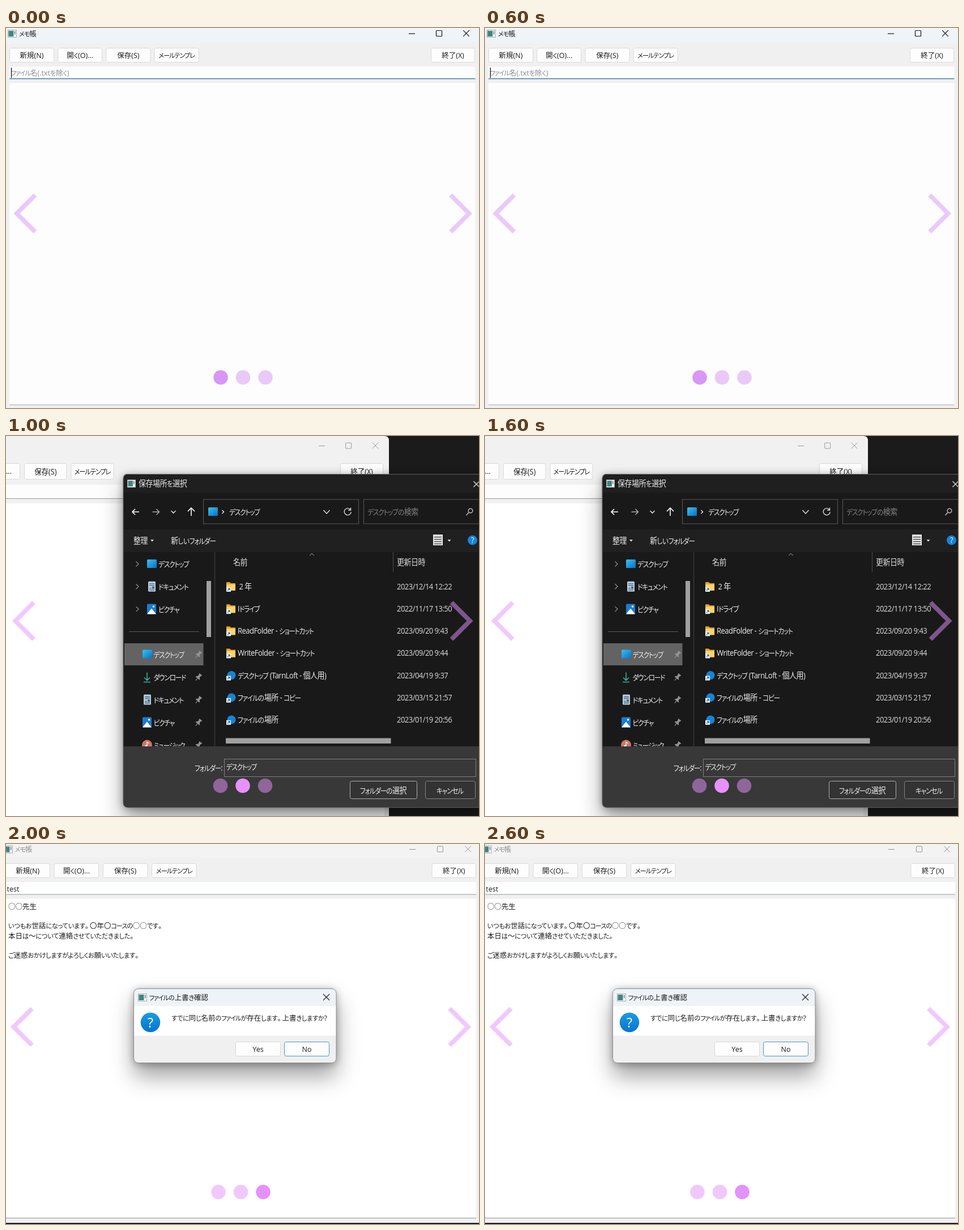
Animation of 835x671 px, one loop 3 s. Source, as an HTML page:

```html
<!DOCTYPE html>
<html lang="ja">
<head>
<meta charset="utf-8">
<title>メモ帳</title>
<style>
html, body { margin: 0; width: 100%; height: 100%; overflow: hidden; background: #f0f0f0; }
svg { display: block; width: 835px; height: 671px; }
text {
  font: 12.5px "Open Sans", "Noto Sans CJK JP", "Noto Sans CJK", sans-serif;
  font-feature-settings: "palt";
  fill: #1b1b1b;
}
.hira { font-size: .9em; letter-spacing: -.03em; }
.kata { font-size: .9em; letter-spacing: -.1em; }
.stop { letter-spacing: .15em; }
#pick text { scale: 1 1.1; }
.dark text { font-size: 13px; letter-spacing: -.04em; fill: #eee; }
.scene { visibility: hidden; animation: show 3s step-end infinite; }
#pick { animation-delay: -2s; }
#confirm { animation-delay: -1s; }
@keyframes show {
  0% { visibility: visible; }
  33.3333%, 100% { visibility: hidden; }
}
.shadow { filter: drop-shadow(0 2px 7px rgba(0,0,0,.32)) drop-shadow(0 23px 19px rgba(0,0,0,.36)); }
</style>
</head>
<body>
<svg viewBox="0 0 835 671">
  <defs>
    <linearGradient id="bar" x2="0" y2="1">
      <stop offset=".7" stop-color="#eff4f9"/><stop offset="1" stop-color="#f0f0f0"/>
    </linearGradient>
    <linearGradient id="blue" x2="1" y2="1">
      <stop stop-color="#35c3f0"/><stop offset="1" stop-color="#0b6fc4"/>
    </linearGradient>
    <linearGradient id="ask" x2="0" y2="1">
      <stop stop-color="#1a9be6"/><stop offset="1" stop-color="#0a74cc"/>
    </linearGradient>
    <clipPath id="list"><rect x="207" y="205" width="628" height="343"/></clipPath>
  </defs>
  <g id="blank" class="scene"></g>
  <g id="pick" class="scene"></g>
  <g id="confirm" class="scene"></g>
</svg>
<script>
const kana = s => s.replace(/([ぁ-ゖ]+)|([ァ-ヺー]+)|。/g,
  (run, hira, kata) => `<tspan class="${hira ? 'hira' : kata ? 'kata' : 'stop'}">${run}</tspan>`);
const text = (x, y, s, style = '') =>
  `<text style="translate:${x}px ${y}px;${style}">${kana(s)}</text>`;
const mid = (x, y, s, style = '') => text(x, y, s, 'text-anchor:middle;' + style);
const box = (x, y, w, h, fill, more = '') =>
  `<rect x="${x}" y="${y}" width="${w}" height="${h}" fill="${fill}" ${more}/>`;
const line = (d, color, w = 1, more = '') =>
  `<path d="${d}" fill="none" stroke="${color}" stroke-width="${w}" ${more}/>`;
const dot = (x, y, r, fill, more = '') => `<circle cx="${x}" cy="${y}" r="${r}" fill="${fill}" ${more}/>`;

const button = (x, y, w, h, label, stroke = '#d9d9d9') =>
  box(x + .5, y + .5, w - 1, h - 1, '#fdfdfd', `rx="3" stroke="${stroke}"`) +
  mid(x + w / 2, y + h / 2 + 5, label);

const cross = (x, y, r, color, w = 1) =>
  line(`M${x - r} ${y - r}l${2 * r} ${2 * r}m0 ${-2 * r}l${-2 * r} ${2 * r}`, color, w);

const winButtons = (x, y, gap, color, w) =>
  line(`M${x - 5.5} ${y + .5}h11`, color, w) +
  box(x + gap - 5, y - 5, 10, 10, 'none', `rx="1" stroke="${color}" stroke-width="${w}"`) +
  cross(x + 2 * gap, y, 5.3, color, w);

const appIcon = (x, y, w = 16, h = 14) =>
  box(x + .5, y + .5, w - 1, h - 1, '#f4f6f6', 'stroke="#a5adb0"') +
  box(x + 1.5, y + 2, w * .56, h - 4, '#43847f') +
  box(x + w - 4, y + 2.5, 1.5, h * .4, '#6b7680');

// Carousel overlay: chevrons and page dots
const nav = (left, right, y, dots, dotY, active, color) => {
  const chevron = (x, dir) =>
    line(`M${x + 32.5 * dir} ${y - 32.5}L${x} ${y}l${32.5 * dir} 32.5`, color, 8, 'opacity=".5"');
  return chevron(left, 1) + chevron(right, -1) + [0, 1, 2].map(i =>
    dot(dots + 39.5 * i, dotY, 12.8, color, `opacity="${i === active ? 1 : .5}"`)).join('');
};

const toolbar = (x, y, step, w, h) => ['新規(N)', '開く(O)...', '保存(S)', 'メールテンプレ']
  .map((s, i) => button(x + step * i, y, w, h, s)).join('');

function blank() {
  return box(0, 0, 835, 671, '#f0f0f0') + box(0, 0, 835, 30, 'url(#bar)') + box(0, 0, 835, 1, '#fafafa') +
    appIcon(3, 3) + text(23, 14.5, 'メモ帳') + winButtons(716.5, 9.5, 48, '#111', 1.2) +
    toolbar(6, 35, 85.2, 79, 26) + button(750, 35, 78, 26, '終了(X)') +
    box(6, 68, 822.5, 22, '#fdfdfd') + line('M6 89.5H828.5', '#3f7fb5', 1.5) +
    text(8.5, 84, 'ファイル名(.txtを除く)', 'fill:#8c8c8c') + line('M9.5 70V88', '#000', 1.2) +
    box(6, 97, 822.5, 568, '#fdfdfd') + line('M6 665.5H828.5', '#aaa') +
    nav(19, 817.5, 327.5, 379, 617, 0, '#d896f5');
}

const link = (x, y) => box(x, y, 8, 8, '#f5f5f5') +
  line(`M${x + 2} ${y + 6}l4-4m-3 0h3v3`, '#1769b0', 1.2);
const icons = {
  desk: (x, y) => box(x, y - 8, 17, 15, 'url(#blue)', 'rx="1.5"'),
  doc: (x, y) => box(x + 2, y - 9, 13, 18, '#b9cbdc', 'rx="1.5"') +
    line(`M${x + 4} ${y - 5}h9m-9 3h9m-9 8h9m-9-3h4`, '#44698c', 1.3) + box(x + 9, y, 4, 4, '#44698c'),
  pic: (x, y) => box(x, y - 9, 16, 18, '#1b7bd0', 'rx="1.5"') +
    `<path d="M${x} ${y + 9}l8-10 8 10z" fill="#fff"/>` + dot(x + 11.5, y - 4.5, 1.8, '#fff'),
  down: (x, y) => line(`M${x + 8} ${y - 8}v14m-5-5l5 5 5-5M${x + 2} ${y + 9}h12`, '#35b39c', 1.6),
  music: (x, y) => dot(x + 8, y, 9, '#cf7568') +
    dot(x + 6.5, y + 2, 2, '#fff') + line(`M${x + 8} ${y + 2}v-7l3.5 2`, '#fff', 1.3),
  folder: (x, y) => `<path d="M${x} ${y - 8}h6l2 2h8v13h-16z" fill="#e3a52c"/>` +
    box(x, y - 4, 16, 11, '#ffd365', 'rx="1"') + link(x, y + 1),
  cloud: (x, y) => dot(x + 9, y, 7.5, '#1683d8') + link(x, y + 1)
};
const pin = y => `<g transform="translate(340 ${y}) rotate(40)">` +
  `<path d="M-3-6h6v1.5l-1 1v3l2.5 2.5v1h-9v-1l2.5-2.5v-3l-1-1z" fill="#929292"/>` +
  line('M0 3v5', '#929292', 1.2) + '</g>';

function folderDialog() {
  const tree = [['desk', 'デスクトップ'], ['doc', 'ドキュメント'], ['pic', 'ピクチャ']].map(([k, s], i) => {
    const y = 226 + 39.8 * i;
    return line(`M229.5 ${y - 4.5}l4.5 4.5-4.5 4.5`, '#8d8d8d', 1.3) + icons[k](249, y) + text(269, y + 5, s);
  });
  const pinned = [['desk', 'デスクトップ'], ['down', 'ダウンロード'], ['doc', 'ドキュメント'],
    ['pic', 'ピクチャ'], ['music', 'ミュージック']].map(([k, s], i) => {
    const y = 385.5 + 40 * i;
    return icons[k](241, y) + text(260.5, y + 5, s) + pin(y);
  });
  const files = [
    ['folder', '2 年', '2023/12/14 12:22'],
    ['folder', 'Iドライブ', '2022/11/17 13:50'],
    ['folder', 'ReadFolder - ショートカット', '2023/09/20 9:43'],
    ['folder', 'WriteFolder - ショートカット', '2023/09/20 9:44'],
    ['cloud', 'デスクトップ (TarnLoft - 個人用)', '2023/04/19 9:37'],
    ['cloud', 'ファイルの場所 - コピー', '2023/03/15 21:57'],
    ['cloud', 'ファイルの場所', '2023/01/19 20:56']
  ].map(([k, s, date], i) => {
    const y = 266 + 39.15 * i;
    return icons[k](389, y) + text(i ? 409 : 411.5, y + 5, s) + text(690, y + 5, date, 'fill:#ddd');
  });

  return '<g class="dark">' +
    box(207, 67, 640, 589, '#191919', 'rx="8" class="shadow"') +
    '<path d="M207 100V75q0-8 8-8H835V100z" fill="#1f1f1f"/>' +
    box(207, 165, 628, 40, '#202020') +
    '<path d="M207 548H835V656H215q-8 0-8-8z" fill="#383838"/>' +
    box(207, 67.5, 640, 588.5, 'none', 'rx="8" stroke="#626262"') +
    appIcon(214, 77, 15, 14) + text(234, 89, '保存場所を選択') + cross(830.5, 85, 5, '#eee', 1.2) +
    // Address row
    line('M235 134H223m5-5l-5 5 5 5M327 141V127m-6 6l6-6 6 6', '#fff', 1.6) +
    line('M258.5 134h12m-5-5l5 5-5 5', '#aaa', 1.5) +
    line('M291.5 132l4 4 4-4', '#ddd', 1.6) +
    box(348.5, 112, 274, 43, '#191919', 'stroke="#595959"') +
    box(631.5, 112, 220, 43, '#191919', 'stroke="#595959"') +
    icons.desk(357, 134) + line('M381.5 131l3 3-3 3', '#eee', 1.4) + text(394, 138.5, 'デスクトップ') +
    line('M560.5 131l5.5 6 5.5-6', '#ddd', 1.4) +
    line('M608 130a6 6 0 1 0 1.2 4M608.5 126.5v4.5h-4.5', '#ddd', 1.4) +
    text(638, 139, 'デスクトップの検索', 'fill:#838383') +
    dot(820, 132, 3.8, 'none', 'stroke="#bbb" stroke-width="1.5"') + line('M817 135l-4.5 5', '#bbb', 1.6) +
    // Command row
    text(225, 190, '整理') + text(291, 190, '新しいフォルダー') +
    '<path d="M255 183h6l-3 3.5zM779.5 183h6l-3 3.5z" fill="#ddd"/>' +
    box(754.5, 174.5, 16, 18, '#d8d8d8', 'stroke="#eee"') +
    line('M756 178.5h13m-13 4h13m-13 4h13m-13 4h13', '#333', 1) +
    dot(823.5, 184, 8.5, '#1583dc') + mid(823.5, 188.5, '?', 'fill:#fff') +
    // Tree and file list
    '<g clip-path="url(#list)">' +
    line('M368.5 205V548', '#393939', 1.5) + line('M683.5 205V240', '#4d4d4d') +
    line('M217 345.5H341', '#5c5c5c') + box(354, 256, 8, 99, '#a0a0a0') +
    box(209, 366, 139.5, 39, '#636363') + tree.join('') + pinned.join('') +
    line('M536 211l4-3.5 4 3.5', '#aaa') + text(401, 228, '名前', 'fill:#ddd') +
    text(690, 228, '更新日時', 'fill:#ddd') + files.join('') +
    box(388, 533.5, 291.5, 9.5, '#a0a0a0') + '</g>' +
    // Footer
    text(333, 591, 'フォルダー:') + box(385.5, 570.5, 444, 31, '#383838', 'stroke="#808080"') +
    text(388.5, 588.5, 'デスクトップ') +
    box(607.5, 609.5, 118, 31, '#333', 'rx="3" stroke="#b0b0b0"') + mid(666, 630.5, 'フォルダーの選択') +
    box(740.5, 609.5, 88, 31, '#333', 'rx="3" stroke="#858585"') + mid(783.5, 630.5, 'キャンセル') + '</g>';
}

function pick() {
  return box(0, 0, 835, 671, '#1b1b1b') +
    '<path d="M0 0H668q8 0 8 8V671H0z" fill="#f1f1f1"/>' +
    winButtons(557.5, 17, 47.2, '#9a9a9a', 1) +
    button(-51, 48, 76, 29, '') + text(0, 67, '...') +
    button(32, 48, 75.5, 29, '保存(S)') + button(114.5, 48, 76, 29, 'メールテンプレ') +
    button(590, 48, 76, 29, '終了(X)') +
    box(0, 86, 668, 25, '#fdfdfd') + line('M0 110.5H668', '#999') + box(0, 119, 668, 552, '#fff') +
    folderDialog() + nav(16.5, 819, 326.5, 378.5, 617.5, 1, '#e691ff');
}

function confirmDialog() {
  return box(226, 255, 357, 131.5, '#fff', 'rx="8" class="shadow"') +
    '<path d="M226 286V263q0-8 8-8H575q8 0 8 8V286z" fill="#eef3f8"/>' +
    '<path d="M226 338.5H583V378.5q0 8-8 8H234q-8 0-8-8z" fill="#f0f0f0"/>' +
    box(225.5, 255.5, 357.5, 131, 'none', 'rx="8" stroke="#8c8c8c"') +
    appIcon(233, 264) + text(252.5, 275.5, 'ファイルの上書き確認') + cross(565.5, 270.5, 5.5, '#222', 1.2) +
    dot(255, 315, 17.3, 'url(#ask)') + mid(255, 323.5, '?', 'font-size:24px;fill:#fff') +
    text(292, 312, 'すでに同じ名前のファイルが存在します。上書きしますか?') +
    button(405, 349, 80, 26, 'Yes') + button(491, 349, 80, 26, 'No', '#3f96d6');
}

function confirmScene() {
  const mail = [[115, '○○先生'], [149, 'いつもお世話になっています。〇年〇コースの○○です。'],
    [166.5, '本日は～について連絡させていただきました。'], [201, 'ご迷惑おかけしますがよろしくお願いいたします。']];
  return box(0, 0, 835, 671, '#f0f0f0') + box(0, 0, 835, 24, '#f3f3f3') +
    appIcon(-4, 2.5) + text(15.5, 14, 'メモ帳', 'fill:#8f8f8f') + winButtons(717.5, 9, 49, '#8f8f8f', 1) +
    toolbar(-1.5, 34, 86.2, 79.5, 26) + button(751.5, 34, 78.5, 26, '終了(X)') +
    box(0, 67, 830, 22, '#fff') + line('M0 89H830', '#8d9b93', 1.2) + text(1.5, 83.5, 'test') +
    box(0, 96.5, 830, 564, '#fff') + line('M0 660.5H830', '#939393') + box(0, 669, 835, 2, '#1a1a22') +
    mail.map(([y, s]) => text(4, y, s)).join('') +
    confirmDialog() + nav(13.5, 815.5, 323, 375, 614.5, 2, '#e491fc');
}

const scenes = { blank, pick, confirm: confirmScene };
for (const id in scenes) document.getElementById(id).innerHTML = scenes[id]();
</script>
</body>
</html>
```
